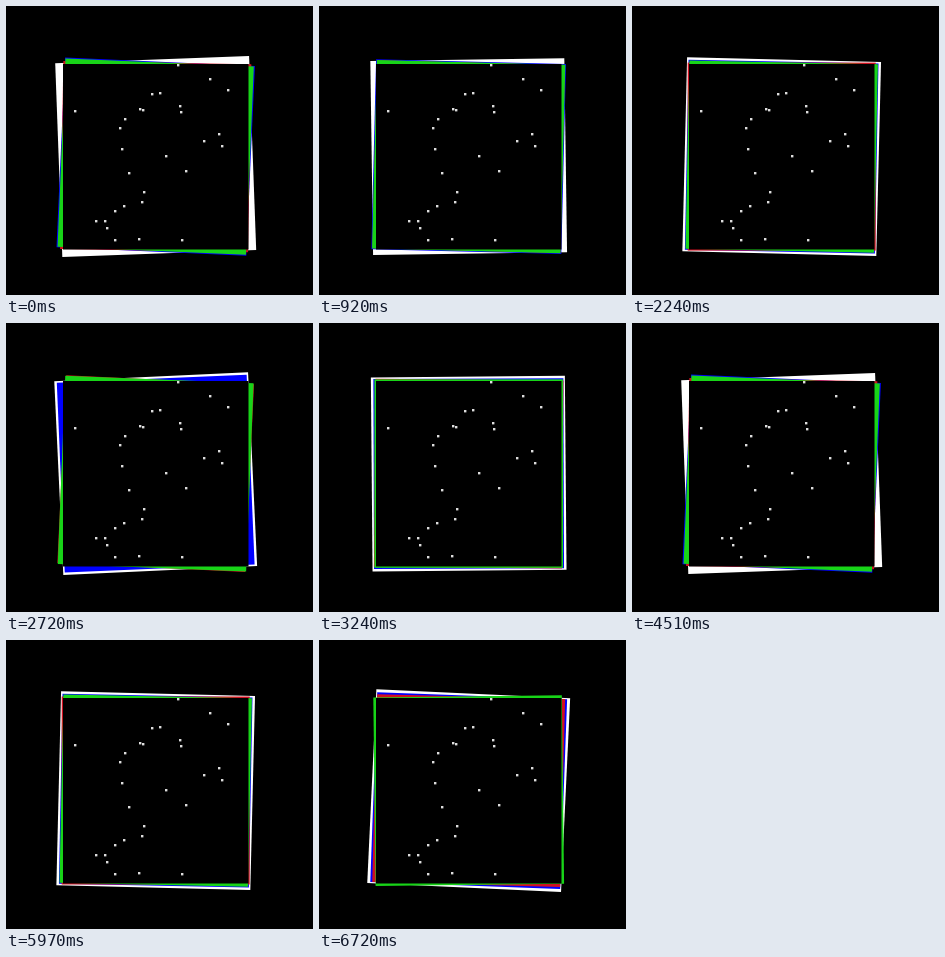
An HTML page with a canvas that plays this animation: 307 by 289 pixels, repeating every 6790 ms.

```html
<!DOCTYPE html>
<html>
<head>
<meta charset="utf-8">
<style>
html, body { margin: 0; width: 100%; height: 100%; overflow: hidden; background: #000; }
canvas { display: block; }
</style>
</head>
<body>
<canvas id="stage" width="307" height="289"></canvas>
<script>
const ctx = document.getElementById('stage').getContext('2d');
const LOOP = 6790;

// Sway: angles in degrees at the shared key times (ms since the sway began).
const times = [0, 60, 300, 610, 750, 1100, 1450, 1820, 2210, 2450, 2700, 2920];
const squares = [
  { color: '#fff', size: 194, angles: [-2.1, -2.1, 4, 2.1, -2.1, -4.1, 1.4, -4, 2.7, -0.5, 4, -2.1] },
  { color: '#00f', size: 190, angles: [2.6, 2.6, -3, 1.6, 2.5, -3, 1.1, -3.5, 2.1, -0.2, -3, 2.6] },
  { color: '#d01020', size: 188, angles: [1, 1, 3, -0.7, 0, 3.5, 0, 3, 1.5, 0.5, -2, 1] },
  { color: '#18d418', size: 188.5, angles: [2.4, 2.4, -2, 0.6, -1.9, 2.5, 1.2, 3, -0.7, 0, 2, 2.4] }
];

const dots = [
  [172, 59], [204, 73], [222, 84], [146, 88], [154, 87], [69, 105], [134, 103],
  [137, 104], [174, 100], [175, 106], [119, 113], [114, 122], [213, 128], [198, 135],
  [216, 140], [116, 143], [160, 150], [180, 165], [123, 167], [138, 186], [136, 196],
  [118, 200], [109, 205], [90, 215], [99, 215], [101, 222], [109, 234], [133, 233], [176, 234]
];

// Each sway follows a still pause of about 800 ms.
function swayTime(t) {
  if (t < 790) return 0;
  if (t < 3710) return t - 790;
  return Math.max(0, t - 4510);
}

function angleAt(angles, u) {
  let i = 0;
  while (i < times.length - 2 && u >= times[i + 1]) i++;
  const p = (u - times[i]) / (times[i + 1] - times[i]);
  const ease = p * p * (3 - 2 * p);
  return angles[i] + (angles[i + 1] - angles[i]) * ease;
}

function drawSquare({ color, size, angles }, u) {
  ctx.save();
  ctx.translate(149.7, 150.6);
  ctx.rotate(angleAt(angles, u) * Math.PI / 180);
  ctx.fillStyle = color;
  ctx.fillRect(-size / 2, -size / 2, size, size);
  ctx.restore();
}

function draw() {
  const u = swayTime(performance.now() % LOOP);
  ctx.fillStyle = '#000';
  ctx.fillRect(0, 0, 307, 289);
  squares.forEach(square => drawSquare(square, u));
  ctx.fillStyle = '#000';
  ctx.fillRect(57, 58, 185.5, 185.5);
  ctx.fillStyle = '#ddd';
  for (const [x, y] of dots) ctx.fillRect(x - 1, y - 1, 2.4, 2.4);
  requestAnimationFrame(draw);
}
draw();
</script>
</body>
</html>
```
